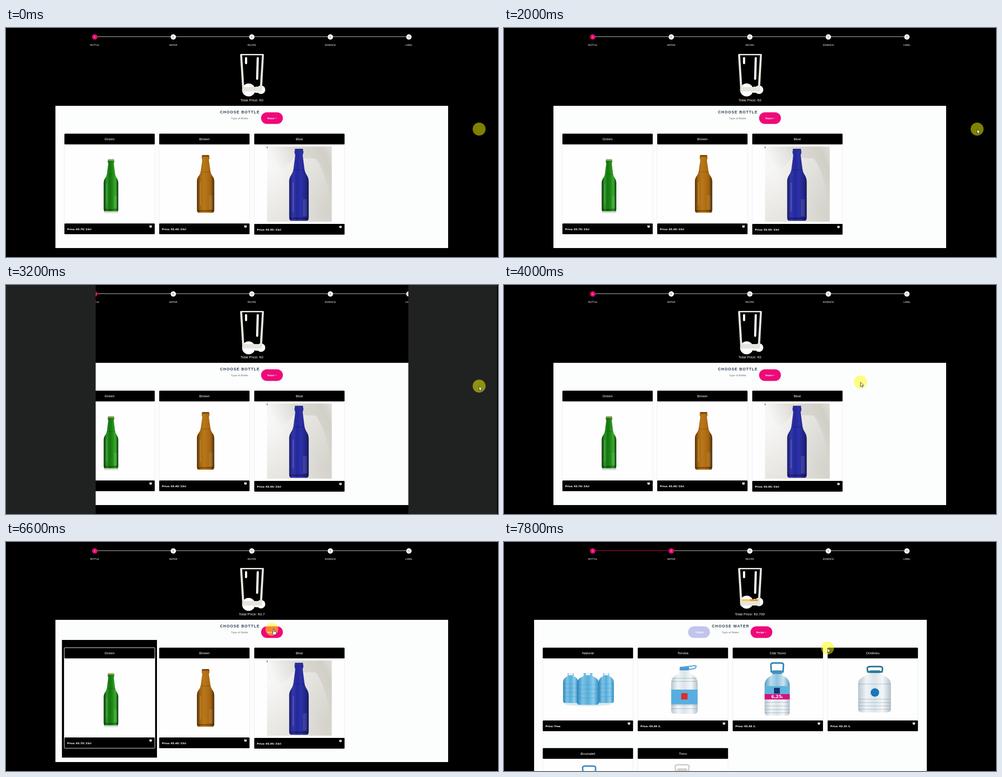
An HTML page that plays this animation: 1095 by 512 pixels, repeating every 8 s.

```html
<!DOCTYPE html>
<html lang="en">
<head>
<meta charset="utf-8">
<title>Bottle configurator</title>
<style>
html, body { margin: 0; width: 100%; height: 100%; overflow: hidden; background: #000; }
svg { display: block; width: 1095px; height: 512px; }
text { font-family: "Liberation Sans", Arial, sans-serif; fill: #fff; }
.mid { text-anchor: middle; }
.step { font-size: 5.13px; }
.name { font-size: 8.1px; }
.title { font-size: 8.55px; font-weight: bold; letter-spacing: 1.14px; fill: #2c3e50; }
.sub { font-size: 6.2px; fill: #666; }
.btn { font: bold 6.2px "Liberation Serif", Times, serif; }
.price { font: bold 5.5px "DejaVu Sans", sans-serif; }
</style>
</head>
<body>
<svg id="stage" viewBox="0 0 1095 512"></svg>
<script>
const PINK = '#ee0979', PAGE = '#fcfdfd';
const $ = id => document.getElementById(id);

const rect = (x, y, w, h, fill, more = '') =>
  `<rect x="${x}" y="${y}" width="${w}" height="${h}" fill="${fill}" ${more}/>`;
const circle = (x, y, r, fill, more = '') =>
  `<circle cx="${x}" cy="${y}" r="${r}" fill="${fill}" ${more}/>`;
const path = (d, fill, more = '') => `<path d="${d}" fill="${fill}" ${more}/>`;
const line = (d, color, w) =>
  path(d, 'none', `stroke="${color}" stroke-width="${w}" stroke-linecap="round" stroke-linejoin="round"`);
const text = (x, y, cls, s, more = '') => `<text x="${x}" y="${y}" class="${cls}" ${more}>${s}</text>`;
const place = (x, y, w, h, body) => `<g transform="translate(${x} ${y}) scale(${w} ${h})">${body}</g>`;

const gradient = (id, colors, dir = 'x2="1" y2="0"') =>
  `<linearGradient id="${id}" x1="0" y1="0" ${dir}>` + colors.map((c, i) =>
    `<stop offset="${i / (colors.length - 1)}" stop-color="${c}"/>`).join('') + '</linearGradient>';

const defs = '<defs>' +
  gradient('green', ['#08300a', '#2e9a24', '#167312', '#1f8a17', '#3bab2c', '#0a3a0a']) +
  gradient('brown', ['#51300a', '#a8680f', '#b8771a', '#b06f14', '#a26310', '#4a2a08']) +
  gradient('blue', ['#1b1c6b', '#3238a8', '#23279a', '#2c31a8', '#23288e', '#181a60']) +
  gradient('photo', ['#f6f6f5', '#dcdad5', '#d2cfc7', '#f5f5f3'], 'x2="1" y2="-.5"') +
  gradient('shade', ['#ffffff', '#d3d0c8'], 'x2=".5" y2="1"') +
  gradient('azure', ['#2b83b8', '#7cc4e6', '#58addb', '#8bd0ee', '#2f88bd']) +
  gradient('clear', ['#b9c6cf', '#f0f4f6', '#dbe4ea', '#f4f7f8', '#b4c1ca']) +
  gradient('aqua', ['#5a9fbf', '#b9dced', '#8fc4df', '#c8e4f0', '#5f9fbd']) +
  '<clipPath id="body1"><rect x="130" y="260" width="201" height="177"/></clipPath></defs>';

// Both shapes are one unit wide and high, centred on x, top at 0.
const BOTTLE = 'M-.2 0H.2L.23 .05L.19 .09L.28 .28C.33 .37 .5 .37 .5 .46V.95Q.5 1 .4 1H-.4Q-.5 1 -.5 .95V.46' +
  'C-.5 .37 -.33 .37 -.28 .28L-.19 .09L-.23 .05Z';
const JUG = 'M-.2 0H.2V.1C.42 .16 .5 .22 .5 .34V.92Q.5 1 .38 1H-.38Q-.5 1 -.5 .92V.34C-.5 .22 -.42 .16 -.2 .1Z';

const bottle = (x, y, w, h, tone, cap) => place(x, y, w, h,
  path(BOTTLE, `url(#${tone})`) +
  rect(-.2, 0, .4, .03, cap) +
  rect(-.27, .29, .54, .008, '#000', 'opacity=".25"') +
  rect(-.33, .47, .07, .4, '#fff', 'opacity=".14"') +
  rect(.2, .7, .2, .24, '#fff', 'opacity=".1"') +
  rect(-.47, .955, .94, .02, '#000', 'opacity=".35"'));

const jug = (x, y, w, h, tone, rings) => {
  let ribs = '';
  for (const r of rings) ribs += rect(-.49, r, .98, .012, '#456f88', 'opacity=".35"');
  return place(x, y, w, h, path(JUG, `url(#${tone})`) + ribs);
};

const handle = (x, y, w, h, color) =>
  line(`M${x - w / 2 + 3} ${y + h}L${x - w / 2 + 2} ${y + 6}Q${x - w / 2 + 2} ${y + 2} ${x - w / 4} ${y + 2}` +
    `H${x + w / 4}Q${x + w / 2 - 2} ${y + 2} ${x + w / 2 - 2} ${y + 6}L${x + w / 2 - 3} ${y + h}Z`, color, 3.4);

const help = (x, y) => circle(x, y, 2.8, '#fff') +
  text(x, y + 1.8, 'mid', '?', 'style="font-size:5px;font-weight:bold;fill:#000"');

const card = (x, y, h, name, price, art) =>
  rect(x, y + 20, 201, h + 10, '#fefefe', 'stroke="#dfe6ee" stroke-width=".7"') + art +
  rect(x, y, 201, 24, '#000', 'rx="1.5"') +
  rect(x, y + 24 + h, 201, 24, '#000', 'rx="1.5"') +
  text(x + 100.5, y + 15, 'name mid', name) +
  text(x + 6, y + h + 38.7, 'price', price) + help(x + 192, y + h + 30.6);

const button = (x, color, label) => rect(x, 188.5, 48.5, 26, color, 'rx="13"') +
  text(x + 24.2, 203.7, 'btn mid', label);

const steps = ['BOTTLE', 'WATER', 'RECIPE', 'ESSENCE', 'LABEL'].map((s, i) => {
  const x = 197.5 + i * 174.8, on = i === 0;
  return (i < 4 ? rect(x, 19, 174.8, 1, '#cfcfcf', `id="bar${i}"`) : '') +
    circle(x, 20, 6, on ? PINK : '#fff', `id="dot${i}"`) +
    text(x, 21.9, 'step mid', i + 1, `id="num${i}" style="fill:${on ? '#fff' : '#333'}"`) +
    text(x, 39.8, 'step mid', s);
}).reverse().join('');

const glass =
  `<g id="bubbles">${circle(540, 138.5, 14.6, '#fff')}${circle(557.5, 138, 7, '#fff')}${circle(567.5, 138, 9.6, '#fff')}</g>` +
  `<g id="liquid">${rect(529, 128, 18.5, 4, '#fbc83c')}${rect(547.5, 128, 18, 4, '#ee9420')}</g>` +
  path('M521 60Q521 58 523 58H572Q574 58 574 60L569.5 142H526ZM525.6 61L530.2 132H565.2L569.6 61Z',
    '#e6e4dc', 'fill-rule="evenodd"') +
  line('M534.3 67.5V78.5', '#fff', 4.8) + line('M560.3 67.5L559 113.5', '#fff', 4.8) +
  text(547.2, 163.8, 'mid', '', 'id="total" style="font-size:8.07px"');

const bottlePage = '<g id="bottles">' + rect(110, 174, 874, 318, PAGE) +
  text(476.3, 191.3, 'title', 'CHOOSE BOTTLE') + text(519.7, 203.6, 'sub mid', 'Type of Bottle') +
  button(567.7, PINK, 'Water &gt;') +
  rect(124.5, 219, 211.5, 263, '#000', 'class="chosen"') +
  card(130, 236.3, 176.7, 'Green', 'Price: €0.70/ 33cl',
    '<g clip-path="url(#body1)"><g id="green1">' +
    rect(218, 408, 32, 6, '#d9dedd') + bottle(233.7, 293, 32.5, 117, 'green', '#b9a273') + '</g></g>') +
  rect(129.7, 236.3, 201.6, 224.8, 'none', 'class="chosen" stroke="#fff" stroke-width="1" rx="1.5"') +
  card(341, 236.3, 176.7, 'Brown', 'Price: €0.40/ 33cl', bottle(444.2, 284, 38.6, 129, 'brown', '#7a4a10')) +
  card(552.5, 236.3, 177.7, 'Blue', 'Price: €0.95/ 33cl',
    rect(581, 265, 144, 168, 'url(#photo)') +
    path('M581 300Q606 340 640 290L690 292Q722 340 725 433H581Z', 'url(#shade)', 'opacity=".55"') +
    rect(580.6, 265, 1.2, 4, '#333') +
    bottle(652, 270, 43.5, 161, 'blue', '#2a2f92')) + '</g>';

const jugs = [[148.5, 293, 34, 67], [227.5, 293, 34, 67], [187, 293, 49, 71]].map(([x, y, w, h]) =>
  jug(x, y, w, h, 'azure', [.36, .5, .64, .78]) + rect(x - 5, y, 10, 5, '#e9f1f5', 'rx="1"')).join('');

const waterPage = '<g id="waters">' + rect(67, 174, 874, 400, PAGE) +
  button(409.8, '#c2c4ee', '&lt; Bottle') + button(548.8, PINK, 'Recipe &gt;') +
  text(462.8, 191.3, 'title', 'CHOOSE WATER') + text(503.7, 203.6, 'sub mid', 'Type of Water') +
  card(86.3, 236.3, 138.7, 'Natural', 'Price: Free',
    '<ellipse cx="187" cy="362" rx="52" ry="5" fill="#dbe9f0"/>' + jugs) +
  card(297.7, 236.3, 138.7, 'Torvea', 'Price: €0.69 /L',
    jug(401.5, 284, 59, 100, 'clear', [.2, .27, .8, .88]) +
    rect(391, 279, 21, 8, '#4c9bd0', 'rx="2"') + line('M396 280L425 276.5Q431 278 424 283L411 285', '#5fa6d6', 2.6) +
    rect(372.3, 330, 58.6, 33, '#58aee0') + rect(394.5, 338, 14, 14, '#dd2e2a')) +
  card(509, 236.3, 138.7, 'Clar Nuvo', 'Price: €0.58 /L',
    jug(608, 288, 56, 100, 'clear', [.7, .78, .86, .93]) +
    path('M597 288H619V298C632 304 636 310 636 322V340H580V322C580 310 584 304 597 298Z', 'url(#aqua)') +
    handle(608, 268.5, 32, 22, '#2f83b3') + rect(597, 287, 22, 8, '#3f92c0', 'rx="2"') +
    rect(580, 322, 56, 18, '#5fb4dc') + rect(601, 326, 13, 13, '#1d2f78') +
    rect(580, 340, 56, 12, '#d5127f') +
    text(608, 349.3, 'mid', '6,25<tspan font-size="5">L</tspan>',
      'style="font:bold 9.5px DejaVu Sans,sans-serif"')) +
  card(720.3, 236.3, 138.7, 'Ondiveu', 'Price: €0.35 /L',
    jug(824.7, 287, 73, 94, 'clear', [.32, .68, .76, .84, .92]) +
    handle(825.5, 276.5, 38, 14, '#2b7595') + rect(813, 287, 25, 6, '#2f7d9d', 'rx="2"') +
    circle(825.5, 336.5, 9.5, '#1a78b8')) +
  card(86.3, 460.8, 138.7, 'Brumalet', 'Price: €0.45 /L',
    jug(189.5, 512, 56, 90, 'clear', []) + handle(189.5, 499, 33, 20, '#4a8fc4')) +
  card(297.7, 460.8, 138.7, 'Tivro', 'Price: €0.40 /L',
    jug(396.5, 508, 56, 90, 'clear', []) + handle(396.5, 496, 35, 16, '#d5d2d0') +
    rect(386, 506, 21, 6, '#d9d0c6')) + '</g>';

const doors = rect(0, 0, 547.5, 512, '#202222', 'id="doorL"') + rect(547.5, 0, 545.5, 512, '#202222', 'id="doorR"');

const pointer = `<g id="pointer">${circle(0, 0, 14.4, '#ff0', 'opacity=".5"')}` +
  path('M0 .3V10.3L2.4 8.2L4 11.8L5.6 11L4.1 7.6H7.2Z', '#fff', 'id="arrow" stroke="#111" stroke-width=".8"') +
  path('M2.8 1Q2.8-.8 4-.8T5.2 1V5L9 5.8Q10 6.2 9.8 8L9 12.5H3.8L.6 8.2Q.2 6.8 2.8 7.6Z',
    '#fff', 'id="hand" stroke="#111" stroke-width=".8"') + '</g>';

$('stage').innerHTML = defs + steps + glass + bottlePage + waterPage + doors + pointer;

const LOOP = 8000, STEP = 200;
const RELOAD = 2600, HOVER = 4500, CHOOSE = 5200, LEAVE = 5600, NEXT = 7170;
const mouse = [[0, 1053, 226], [3600, 1053, 226], [4000, 793.3, 217], [4400, 420, 300], [4800, 224, 364],
  [5600, 224, 364], [6000, 470, 240], [6400, 591.7, 195], [7200, 591.7, 195], [7800, 720, 237]];
const float = [[0, 0], [RELOAD - 1, 0], [RELOAD, 2], [5400, 2], [6600, 1], [NEXT, 1], [7800, -4]];

const clamp = v => Math.min(1, Math.max(0, v));
const ramp = (t, from, length) => clamp((t - from) / length);
const smooth = v => v * v * (3 - 2 * v);
const cubic = v => v < .5 ? 4 * v ** 3 : 1 - 4 * (1 - v) ** 3;
const back = v => {
  const s = 2.5949, x = 2 * v;
  return x < 1 ? x * x * ((s + 1) * x - s) / 2 : ((x - 2) ** 2 * ((s + 1) * (x - 2) + s) + 2) / 2;
};
const at = (table, t) => {
  const i = table.findIndex(row => row[0] > t);
  if (i < 0) return table[table.length - 1].slice(1);
  const a = table[i - 1], b = table[i], k = (t - a[0]) / (b[0] - a[0]);
  return a.slice(1).map((v, n) => v + (b[n + 1] - v) * k);
};
const set = (id, name, value) => $(id).setAttribute(name, value);
const show = (el, on) => { el.style.display = on ? '' : 'none'; };

function render(t) {
  const next = t >= NEXT, chosen = t >= CHOOSE;
  const p = back(ramp(t, NEXT, 810));
  const [x, y] = at(mouse, t);

  set('dot1', 'fill', next ? PINK : '#fff');
  $('num1').style.fill = next ? '#fff' : '#333';
  set('bar0', 'fill', next ? '#c80a68' : '#cfcfcf');
  $('total').textContent = 'Total Price: €' + (next ? '0.700' : chosen ? '0.7' : '0');
  set('bubbles', 'transform', `translate(0 ${at(float, t)[0]})`);
  const rise = ramp(t, NEXT, 630);
  set('liquid', 'transform', `translate(0 ${132 * (1 - rise)}) scale(1 ${rise})`);

  document.querySelectorAll('.chosen').forEach(el => show(el, chosen));
  const zoom = 1 + .5 * (smooth(ramp(t, HOVER, 400)) - smooth(ramp(t, LEAVE, 400)));
  set('green1', 'transform', `translate(231.5 349) scale(${zoom}) translate(-231.5 -349)`);
  set('bottles', 'transform', `translate(547 333) scale(${1 - .2 * p}) translate(-547 -333)`);
  set('bottles', 'opacity', clamp(1 - p));
  set('waters', 'transform', `translate(${43 + 437 * (1 - p)} 0)`);
  set('waters', 'opacity', clamp(p));

  const slide = 547.5 * cubic(ramp(t, 2815, 700));
  const closed = t >= RELOAD && t < 3600;
  show($('doorL'), closed);
  show($('doorR'), closed);
  set('doorL', 'width', 547.5 - slide);
  set('doorR', 'x', 547.5 + slide);
  set('doorR', 'width', Math.max(0, 545.5 - slide));

  set('pointer', 'transform', `translate(${x} ${y})`);
  const overButton = t >= 6400 && t < 7300;
  show($('hand'), overButton);
  show($('arrow'), t >= 1600 && !overButton);
}

const start = performance.now();
function tick(now) {
  const t = Math.max(0, now - start) % LOOP;
  render(Math.floor(t / STEP) * STEP);
  requestAnimationFrame(tick);
}
render(0);
requestAnimationFrame(tick);
</script>
</body>
</html>
```
